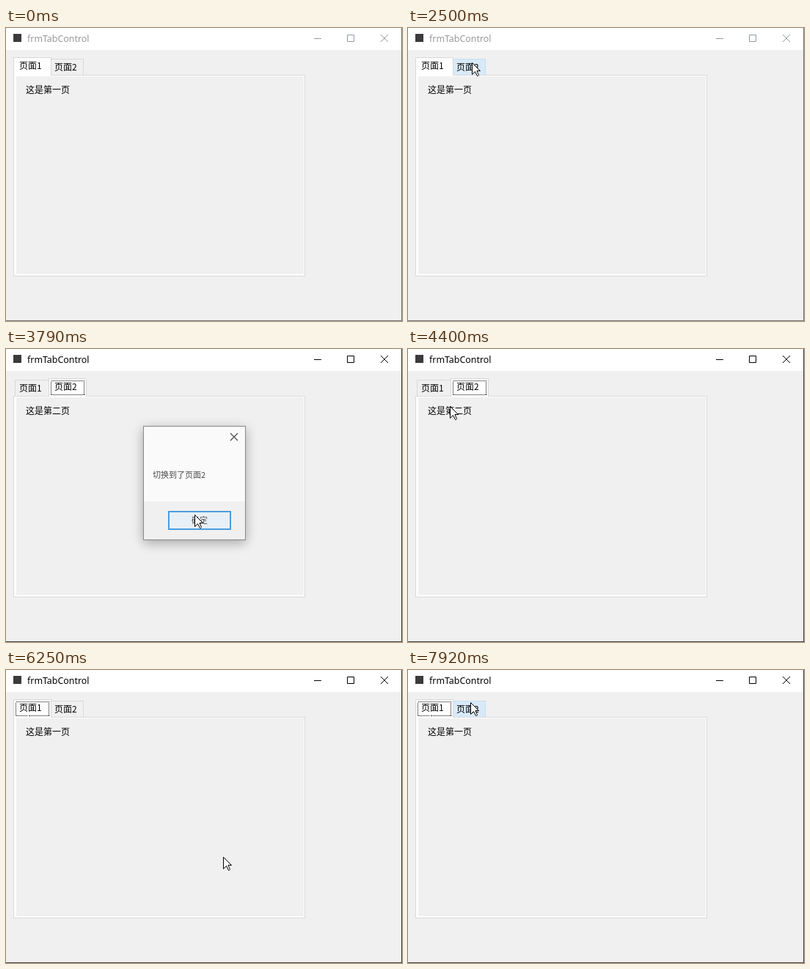
An HTML page that plays this animation: 540x400 px, repeating every 8000 ms.

```html
<!DOCTYPE html>
<html lang="zh-CN">
<head>
<meta charset="utf-8">
<title>frmTabControl</title>
<style>
  html, body { margin: 0; width: 100%; height: 100%; overflow: hidden; background: #f0f0f0; }
  svg { display: block; }
  text { font: 12px "Noto Sans CJK SC", "Noto Sans CJK", "Noto Sans", sans-serif; fill: #000; }
  rect, .tab { shape-rendering: crispEdges; }
  .tab { fill: #f0f0f0; stroke: #d9d9d9; }
  .tab.hot { fill: #d8eaf9; stroke: #c6deef; }
  .tab.selected { fill: #fff; }
  .focus { fill: none; stroke: #000; stroke-dasharray: 1 1; }
  .glyph { fill: none; stroke: #000; }
  .title { font: 12.4px "Noto Sans", "Open Sans", sans-serif; }
  .frame { fill: #444; }
  .inactive .title { fill: #999; }
  .inactive .glyph { stroke: #929aa3; }
  .inactive .frame { fill: #777; }
  .inactive .focus { display: none; }
  #dialog text { font-size: 11px; }
  #panel { fill: #fff; stroke: #5a5a5a; filter: drop-shadow(0 4px 8px rgba(0, 0, 0, .45)); }
  #ok { fill: #e1e1e1; stroke: #0078d7; stroke-width: 2; }
  #ok.hot { fill: #e5f1fb; }
</style>
</head>
<body>
<svg width="540" height="400" viewBox="0 0 540 400">
  <g id="window">
    <rect width="540" height="400" fill="#f0f0f0"/>
    <rect width="540" height="30" fill="#fff"/>
    <rect x="10" y="8" width="11" height="11" fill="#3c3a3d"/>
    <text class="title" x="29" y="19">frmTabControl</text>
    <path class="glyph" d="M420 14.5H430M465.5 9.5H474.5V18.5H465.5ZM511 9L521 19M521 9L511 19"/>
    <rect class="frame" x="539" width="1" height="400"/>
    <rect class="frame" y="399" width="540" height="1"/>

    <path id="idleTab" class="tab"/>
    <rect x="10.5" y="64.5" width="397" height="274" fill="#fff" stroke="#d9d9d9"/>
    <rect x="14" y="66" width="392" height="270" fill="#f0f0f0"/>
    <rect id="tabFill" y="41" width="50" height="25" fill="#fff"/>
    <path id="openTab" class="tab selected"/>
    <rect id="focus" class="focus" y="43.5" width="45" height="19"/>
    <text id="label1" x="18">页面1</text>
    <text id="label2" x="66">页面2</text>
    <text id="content" x="27" y="89"></text>
  </g>

  <g id="dialog">
    <rect id="panel" x="187.5" y="105.5" width="139" height="155"/>
    <rect x="188" y="208" width="138" height="52" fill="#f0f0f0"/>
    <path class="glyph" stroke-width="1.2" d="M306 115L316 125M316 115L306 125"/>
    <text id="message" x="200" y="176"></text>
    <rect id="ok" x="222" y="222" width="84" height="24"/>
    <text x="253" y="238">确定</text>
  </g>

  <path id="cursor" d="M.5.5V16.5L4.5 12.5 7.5 18.5H8.5L9.5 17.5 7 11.5H11.5Z" fill="#fff" stroke="#000"/>
</svg>
<script>
const LOOP = 8000, FADE = 130, APPEAR = 270;
const $ = id => document.getElementById(id);

const point = (x, y) => ({ x, y });
const move = (from, until, to) => ({ from, until, to });
const entry = point(258, 315), okButton = point(262, 230);
const tab1 = point(38, 53), tab2 = point(87, 47);

// The pointer rests between moves.
const moves = [
  move(APPEAR, 1210, point(119, 140)),
  move(1410, 1900, point(34, 60)),
  move(1900, 2500, tab2),
  move(2700, 3240, point(241, 190)),
  move(3240, 3590, okButton),
  move(3780, 4400, point(57, 78)),
  move(4400, 4600, tab1),
  move(4860, 5170, point(82, 94)),
  move(5170, 5370, point(200, 186)),
  move(5370, 5920, okButton),
  move(6100, 6750, point(368, 309)),
  move(6810, 6950, point(353, 285)),
  move(7220, 7920, point(85, 44))
];
const dialogs = [
  { open: 2700, close: 3750, page: 2 },
  { open: 4750, close: 6050, page: 1 }
];

const clamp = v => Math.max(0, Math.min(1, v));
const ease = k => k * (1.5 - k / 2);
const mix = (a, b, k) => Math.round(a + (b - a) * k);

function pointerAt(t) {
  return moves.reduce((p, { from, until, to }) => {
    const k = ease(clamp((t - from) / (until - from)));
    return point(mix(p.x, to.x, k), mix(p.y, to.y, k));
  }, entry);
}

const inside = (p, left, top, right, bottom) =>
  p.x >= left && p.x < right && p.y >= top && p.y < bottom;
const tabShape = (left, top, right) => `M${left + .5} 65V${top + .5}H${right - .5}V65`;

function drawTabs(page, pointer, modal) {
  const first = page === 1;
  const openX = first ? 10 : 58;
  const idleX = first ? 61 : 12;
  const idleEnd = first ? 106 : 59;
  $('openTab').setAttribute('d', tabShape(openX, 40, openX + 52));
  $('idleTab').setAttribute('d', tabShape(idleX, 42, idleEnd));
  $('idleTab').classList.toggle('hot', !modal && inside(pointer, idleX + 1, 42, idleEnd, 65));
  $('tabFill').setAttribute('x', openX + 1);
  $('focus').setAttribute('x', openX + 3.5);
  $('label1').setAttribute('y', first ? 56 : 58);
  $('label2').setAttribute('y', first ? 58 : 56);
  $('content').textContent = first ? '这是第一页' : '这是第二页';
}

function drawDialog(t, latest, page, pointer) {
  const opacity = latest
    ? Math.min(clamp((t - latest.open + 40) / FADE), clamp(1 - (t - latest.close) / FADE))
    : 0;
  $('dialog').style.display = opacity ? '' : 'none';
  $('dialog').style.opacity = opacity;
  $('message').textContent = `切换到了页面${page}`;
  $('ok').classList.toggle('hot', inside(pointer, 221, 221, 307, 247));
}

function draw(t) {
  const pointer = pointerAt(t);
  const latest = dialogs.filter(d => t >= d.open).pop();
  const modal = !!latest && t < latest.close;
  const page = latest ? latest.page : 1;

  $('window').classList.toggle('inactive', !latest || modal);
  drawTabs(page, pointer, modal);
  drawDialog(t, latest, page, pointer);
  $('cursor').style.display = t < APPEAR ? 'none' : '';
  $('cursor').setAttribute('transform', `translate(${pointer.x} ${pointer.y})`);
}

const start = performance.now();
function tick() {
  draw((performance.now() - start) % LOOP);
  requestAnimationFrame(tick);
}
tick();
</script>
</body>
</html>
```
